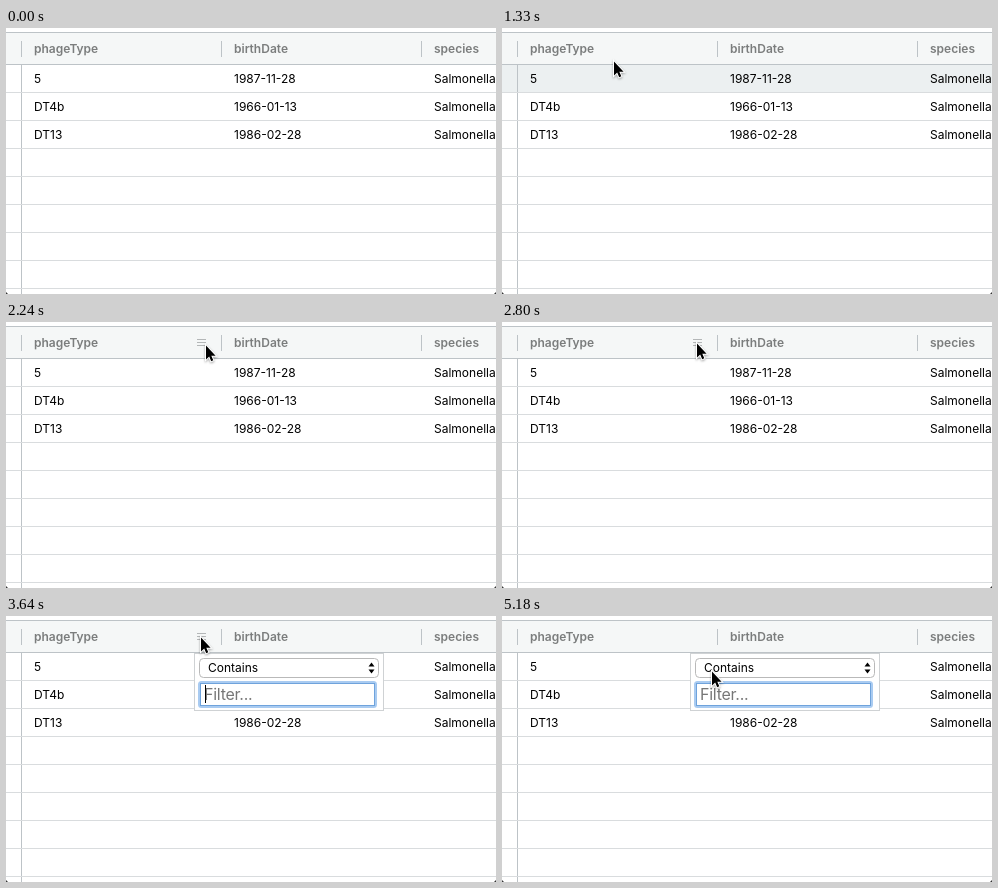
These frames come from a looping animation (490x266 px, 5.74 s). An HTML page:

```html
<!DOCTYPE html>
<html lang="en">
<head>
<meta charset="utf-8">
<title>Column filter</title>
<style>
html, body { margin: 0; width: 100%; height: 100%; overflow: hidden; background: #fff; }
svg { display: block; width: 490px; height: 266px; }
text { font: 12px Inter, Roboto, sans-serif; fill: #000; }
.head text { font-weight: 600; fill: #7b7d7d; }
.ph { font-size: 16px; letter-spacing: -.25px; fill: #777; }
.line { fill: none; stroke: #bdc3c7; }
.soft { stroke: #d9dcde; }

/* one tick is 70 ms, 82 ticks per loop */
.anim { animation: 5740ms step-end -3ms infinite; }
#hover { animation-name: hover; }
#menu { animation-name: menu; }
#ring { animation-name: ring; }
#popup { animation-name: popup; }
#focus { animation-name: focus; }
#caret { animation-name: caret; }
#cursor { animation-name: cursor; filter: drop-shadow(0 1px 1px rgba(0, 0, 0, .35)); }

@keyframes hover {
  0% { opacity: 0; transform: translateY(168px); }
  13.415% { opacity: 1; transform: translateY(168px); animation-timing-function: steps(6); }
  20.732% { opacity: 1; transform: none; }
  24.39%, 100% { opacity: 0; transform: none; }
}
@keyframes menu {
  0% { opacity: 0; }
  24.39% { opacity: 0; animation-timing-function: steps(3); }
  28.049% { opacity: 1; }
  75.61% { opacity: 1; animation-timing-function: steps(3); }
  79.268%, 100% { opacity: 0; }
}
@keyframes ring {
  0%, 62.195%, 100% { opacity: 0; }
  59.756% { opacity: 1; }
}
@keyframes popup {
  0% { opacity: 0; }
  62.195%, 100% { opacity: 1; }
}
@keyframes focus {
  0% { opacity: 0; }
  63.415%, 100% { opacity: 1; }
}
@keyframes caret {
  0%, 71.951%, 90.244%, 100% { opacity: 0; }
  63.415%, 81.707% { opacity: 1; }
}
@keyframes cursor {
  0% { opacity: 0; transform: translate(150px, 222px); }
  13.415% { opacity: 1; transform: translate(150px, 222px); animation-timing-function: steps(2); }
  15.854% { transform: translate(138px, 150px); animation-timing-function: steps(2); }
  18.293% { transform: translate(126px, 95px); animation-timing-function: steps(2); }
  20.732% { transform: translate(117px, 55px); animation-timing-function: steps(2); }
  23.171% { transform: translate(112px, 34px); animation-timing-function: steps(6); }
  30.488% { transform: translate(162px, 24px); animation-timing-function: steps(3); }
  34.146% { transform: translate(197px, 24px); }
  35.366% { transform: translate(199px, 25px); }
  36.585% { transform: translate(200px, 25px); }
  39.024% { transform: translate(200px, 24px); }
  40.244% { transform: translate(199px, 24px); }
  42.683% { transform: translate(198px, 24px); }
  43.902% { transform: translate(198px, 24px); animation-timing-function: steps(4); }
  48.78% { transform: translate(195px, 22px); }
  69.512% { transform: translate(195px, 22px); animation-timing-function: steps(8); }
  79.268% { transform: translate(211px, 37px); }
  80.488% { transform: translate(212px, 42px); }
  81.707% { transform: translate(212px, 48px); }
  82.927% { transform: translate(211px, 53px); }
  84.146%, 100% { opacity: 1; transform: translate(210px, 56px); }
}
</style>
</head>
<body>
<svg viewBox="0 0 490 266">
  <rect width="490" height="266" fill="#fff"/>
  <rect y="5" width="490" height="31" fill="#f5f7f7"/>
  <rect id="hover" class="anim" y="37" width="490" height="27" fill="#ecf0f1"/>
  <path class="line" d="M0 4.5h490M0 36.5h490M15.5 37v229M15.5 13v16M215.5 13v16M415.5 13v16"/>
  <path class="line soft" d="M0 64.5h490m-490 28h490m-490 28h490m-490 28h490m-490 28h490m-490 28h490m-490 28h490m-490 28h490"/>
  <path d="M0 264v2h2zM490 264v2h-2z" fill="#333"/>

  <g class="head">
    <text x="28" y="25">phageType</text>
    <text x="228" y="25">birthDate</text>
    <text x="428" y="25">species</text>
  </g>
  <g>
    <text x="28" y="55">5</text>
    <text x="228" y="55">1987-11-28</text>
    <text x="428" y="55">Salmonella</text>
    <text x="28" y="83">DT4b</text>
    <text x="228" y="83">1966-01-13</text>
    <text x="428" y="83">Salmonella</text>
    <text x="28" y="111">DT13</text>
    <text x="228" y="111">1986-02-28</text>
    <text x="428" y="111">Salmonella</text>
  </g>

  <path id="menu" class="anim" d="M191 17.5h9m-9 3h9m-9 3h9" stroke="#b4b7b8"/>

  <g id="popup" class="anim">
    <rect x="188.5" y="37.5" width="189" height="57" fill="#fff" stroke="#cfd2d4"/>
    <rect x="193.5" y="42.5" width="179" height="19" rx="4" fill="#fff" stroke="#b9b9b9"/>
    <text x="202" y="56">Contains</text>
    <path d="M362.5 50.5l3-4 3 4zM362.5 53.5l3 4 3-4z"/>
    <rect x="194.5" y="67.5" width="174" height="22" fill="#fff" stroke="#c4c4c4"/>
    <g id="focus" class="anim" fill="none">
      <rect x="193.5" y="66.5" width="176" height="24" rx="2" stroke="#a9cbf1" stroke-width="3"/>
      <rect x="194.5" y="67.5" width="174" height="22" stroke="#6fa3dc"/>
    </g>
    <text class="ph" x="198" y="84">Filter...</text>
    <rect id="caret" class="anim" x="199" y="69" width="1" height="18"/>
  </g>

  <circle id="ring" class="anim" cx="196.5" cy="23" r="21" fill="none" stroke="#000" stroke-opacity=".6" stroke-width="2"/>
  <path id="cursor" class="anim" d="M0 -.5V13.5L3.2 10.5 5.2 15.2 7.3 14.3 5.3 9.8H9.6Z" stroke="#fff" stroke-width="2" paint-order="stroke"/>
</svg>
</body>
</html>
```
